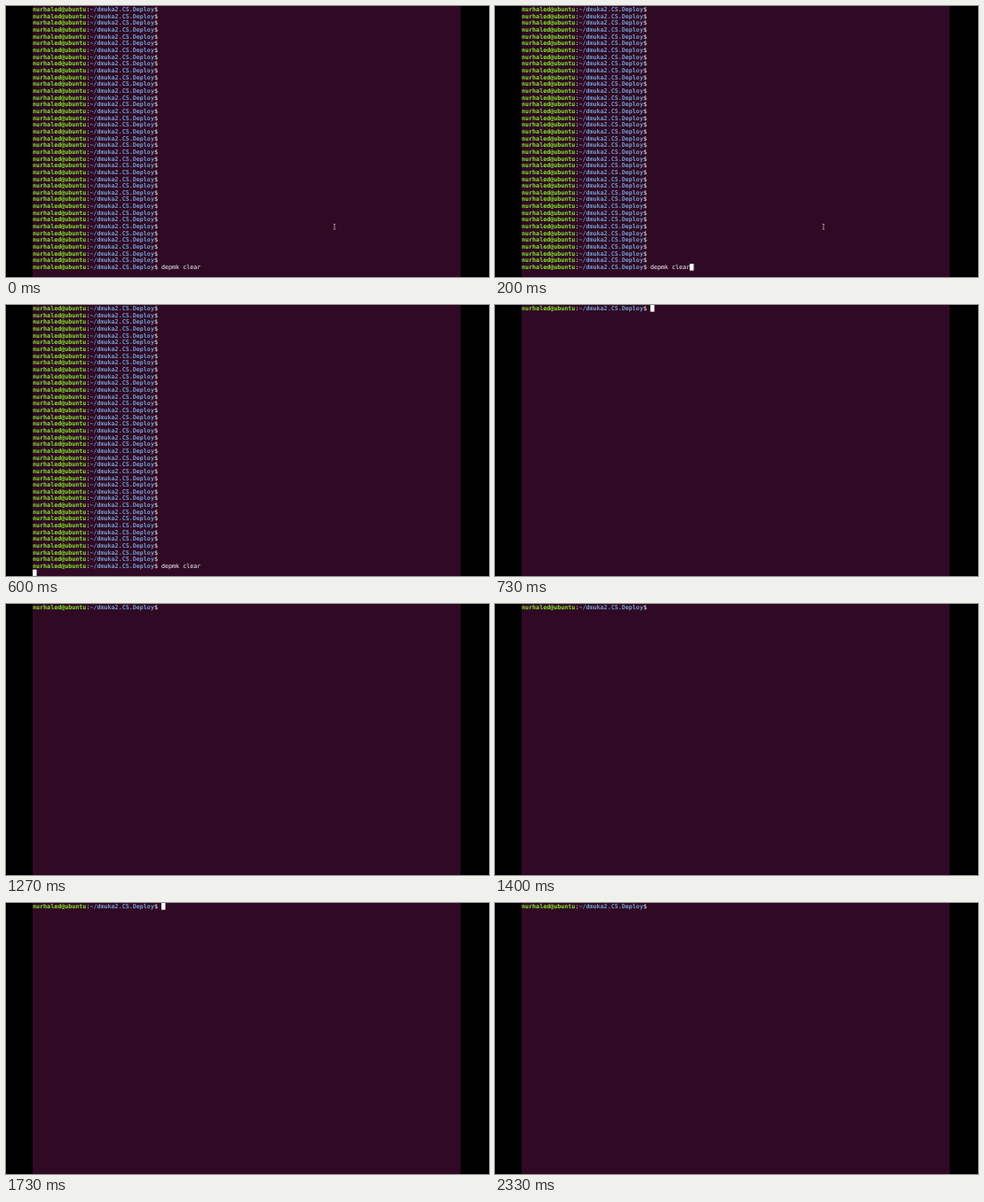
Recreate the animation shown at these times as an HTML page. Size 544 by 306 pixels, loop 2.39 s.

```html
<!DOCTYPE html>
<html lang="en">
<head>
<meta charset="utf-8">
<title>Terminal clear</title>
<style>
  html, body { margin: 0; width: 100%; height: 100%; overflow: hidden; background: #000; }
  svg { display: block; width: 544px; height: 306px; }
  text {
    font: 6.69px "DejaVu Sans Mono", monospace;
    text-rendering: geometricPrecision;
    fill: #fff;
  }
  .user, .path { font-weight: bold; }
  .user { fill: #82e82a; }
  .path { fill: #729fcf; }
  .beam { fill: none; stroke: #b9acb5; stroke-width: .8; }

  .history, .beam, .cursor { animation: 2390ms step-end infinite; }
  .history { animation-name: history; }
  .beam { animation-name: beam; }
  .cursor { animation-name: cursor; fill: #fff; }

  @keyframes history {
    0% { opacity: 1; }
    30.544%, 100% { opacity: 0; }
  }
  @keyframes beam {
    0% { opacity: 1; }
    19.665%, 100% { opacity: 0; }
  }
  /* end of command, next line, then blinking at the fresh prompt */
  @keyframes cursor {
    0% { opacity: 0; transform: translate(189.3px, 291.1px); }
    5.439% { opacity: 1; transform: translate(189.3px, 291.1px); }
    19.665% { opacity: 1; transform: translate(0, 298.7px); }
    30.544% { opacity: 1; transform: translate(145px, 0); }
    44.77% { opacity: 0; transform: translate(145px, 0); }
    72.385% { opacity: 1; transform: translate(145px, 0); }
    97.49%, 100% { opacity: 0; transform: translate(145px, 0); }
  }
</style>
</head>
<body>
<svg viewBox="0 0 544 306">
  <rect width="544" height="306" fill="#000"/>
  <rect x="30" width="482" height="306" fill="#300a24"/>
  <text id="prompt" x="30" y="6"><tspan class="user">nurhaled@ubuntu</tspan>:<tspan class="path">~/dmuka2.CS.Deploy</tspan>$</text>
  <g class="history">
    <g id="rows"></g>
    <text x="175" y="297.1">depmk clear</text>
  </g>
  <path class="beam" d="M368.8 246.4h2.4M370 246.4v5.6M368.8 252h2.4"/>
  <rect class="cursor" x="30" width="4.5" height="7.6"/>
</svg>
<script>
  const ROWS = 39, PITCH = 7.66;
  const prompt = document.getElementById('prompt');
  const rows = document.getElementById('rows');
  for (let i = 1; i < ROWS; i++) {
    const row = prompt.cloneNode(true);
    row.removeAttribute('id');
    row.setAttribute('y', 6 + i * PITCH);
    rows.append(row);
  }
</script>
</body>
</html>
```
